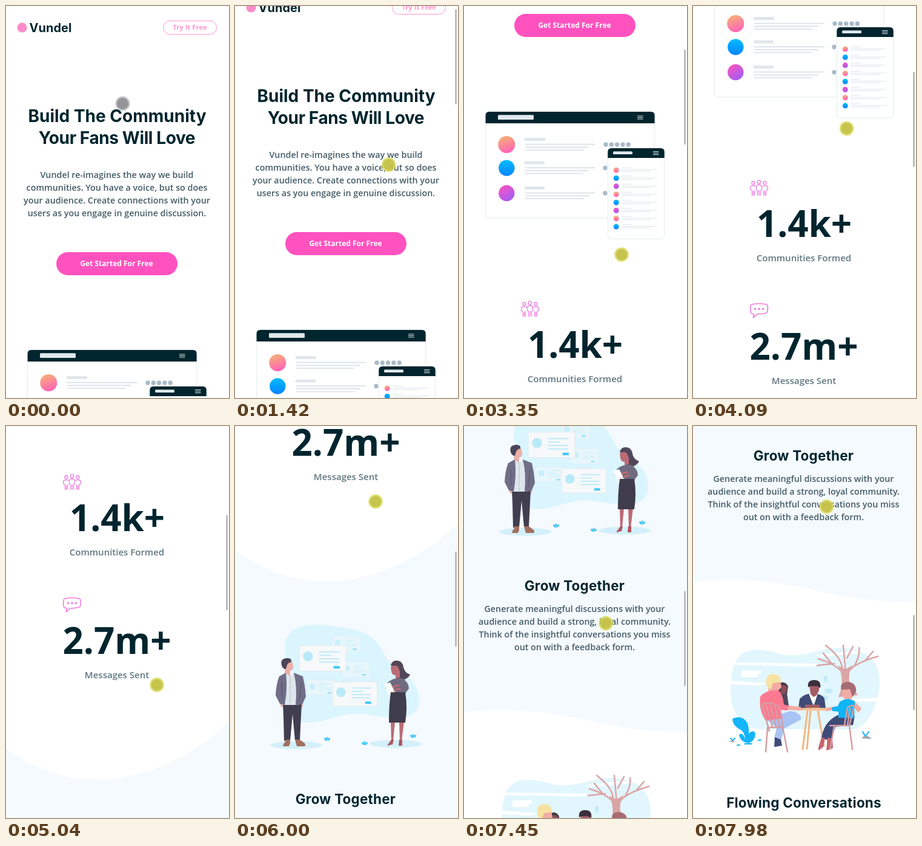
Animation, 368 px wide and 645 px high, one loop 8 s. Source, as an HTML page:

```html
<!DOCTYPE html>
<html lang="en">
<head>
<meta charset="utf-8">
<style>
  html, body { margin: 0; height: 100%; overflow: hidden; background: #fff; }
  svg { display: block; width: 368px; height: 645px; }
  text { text-anchor: middle; }
  .head { font: 700 28px Inter, sans-serif; fill: #00252e; }
  .sub { font-size: 22.4px; letter-spacing: .25px; }
  .copy { font: 600 14.3px "Open Sans", sans-serif; fill: #445c66; }
  .stat { font: 700 60px "Open Sans", sans-serif; fill: #00252e; }
  .label { font: 600 15px "Open Sans", sans-serif; fill: #5f7680; }
  .btn { font: 700 12px "Open Sans", sans-serif; fill: #fff; }
  .line { fill: none; stroke-linecap: round; stroke-linejoin: round; }
</style>
</head>
<body>
<svg viewBox="0 0 368 645">
  <defs>
    <linearGradient id="peach" x2=".35" y2="1"><stop stop-color="#f3b76f"/><stop offset="1" stop-color="#ff68b4"/></linearGradient>
    <linearGradient id="sky" x2="0" y2="1"><stop stop-color="#00bdff"/><stop offset="1" stop-color="#0a84ff"/></linearGradient>
    <linearGradient id="plum" x2=".6" y2="1"><stop stop-color="#ff54b8"/><stop offset="1" stop-color="#a85cf6"/></linearGradient>
  </defs>
  <g id="page">
    <path d="M0 1328C90 1399 235 1407 368 1285V1978C320 1980 280 1975 230 1965S100 1933 0 1946Z" fill="#f5faff"/>

    <circle cx="26.5" cy="35.5" r="8" fill="#fb8cca"/>
    <text class="head" x="73.5" y="42.5" style="font-size:20px">Vundel</text>
    <rect x="259.5" y="24.5" width="88" height="22" rx="11" fill="#fff" stroke="#ff96cf"/>
    <text class="btn" x="303.5" y="39" style="font-size:11.3px;fill:#ff96cf">Try It Free</text>

    <text class="head" x="183.5" y="191">Build The Community</text>
    <text class="head" x="183" y="227" letter-spacing="-.4">Your Fans Will Love</text>
    <g id="intro" class="copy"></g>
    <rect x="83" y="405" width="200" height="38" rx="19" fill="#ff52bf"/>
    <text class="btn" x="182.5" y="428">Get Started For Free</text>

    <g id="devices"></g>

    <g class="line" stroke="#ec7fe0" stroke-width="1.3">
      <path d="M106.5 902.5V895L104.500 893V888Q105 885 109 885T113.500 888V893L111.500 895V902.500M109 894V902.500"/><circle cx="109" cy="880.500" r="2.800"/>
      <g id="friend"><circle cx="99.500" cy="882" r="2.500"/><path d="M97.500 902.500V895L94.700 893V889Q95 886.500 99.500 886.500Q102.500 886.500 103 888M101.500 902.500V895M99.500 896V902.500"/></g>
      <use href="#friend" transform="matrix(-1 0 0 1 218 0)"/>
      <path stroke-width="1.700" d="M97 1082Q109 1079.500 121 1082Q123.500 1083 123.300 1088Q123.500 1095 121 1096Q114 1098 106 1098L99.500 1104L100.500 1098L97 1097Q94.500 1096 94.700 1089T97 1082Z"/>
      <path stroke-width="3.600" d="M102.500 1089.500h.1m6.400 0h.1m6.400 0h.1"/>
    </g>
    <text class="stat" x="183.500" y="971">1.4k+</text>
    <text class="label" x="183" y="1011">Communities Formed</text>
    <text class="stat" x="183" y="1173">2.7m+</text>
    <text class="label" x="183" y="1213">Messages Sent</text>

    <g transform="translate(0 1340)">
      <path fill="#daf5fe" d="M82 150C82 120 105 111 130 111C165 112 195 116 216 126C235 136 240 147 250 166C260 184 304 195 304 236C303 260 282 267 255 264C225 261 210 255 188 258C160 262 142 275 112 271C96 268 102 250 107 232C112 205 82 180 82 150Z"/>
      <g id="cards"></g>
      <g fill="#d3f0fa"><ellipse cx="101" cy="309" rx="43" ry="6.500"/><ellipse cx="265" cy="307" rx="43" ry="6.500"/></g>
      <g id="sprouts" fill="#3fc6f6"></g>

      <path fill="#eab0a8" d="M83 176L94 171L96 178Q97 186 91 187V195H82ZM74 239h6v7h-4zM107 239h6l-2 8h-4z"/>
      <path fill="#4c4459" d="M77 178Q74 167 85 166Q94 165 93 172Q88 173 86 177L84 184Q79 184 77 178Z"/>
      <path fill="#413e50" d="M79 241H110L107 301H99L95 258L91 302H81L80 262Z"/>
      <path fill="#dee6ed" d="M82 190L90 195L97 190L104 243H79Z"/>
      <path fill="#706d86" d="M84 190L73 196Q68 208 67 227L74 241L82 243Q87 215 84 190ZM97 190L112 196Q116 212 117 229L111 242L100 243Q103 214 97 190Z"/>
      <path class="line" stroke="#b6c1cd" d="M91 196V242"/>
      <path class="line" stroke="#565369" d="M77 207L78 232M109 207L106 236"/>
      <path fill="#a36f5e" d="M83 300H91V306L89 311H79Q80 306 83 304ZM99 300H107L115 306Q117 310 115 311H102Z"/>

      <path fill="#51475b" d="M257 178Q259 169 268 170Q277 171 278 181Q280 190 289 193Q286 199 278 202L267 199Q271 188 266 181Z"/>
      <path fill="#bb6b74" d="M257 180Q264 176 269 180L272 188V198L265 199V194Q259 194 258 188ZM257 270H264L261 303H258ZM271 270H279L275 303H272Z"/>
      <path fill="#716b7f" d="M252 206Q262 197 276 199Q287 206 287 216L281 224H257L248 215Z"/>
      <path fill="#fff" d="M246 209L256 206L265 223L254 227Z"/>
      <path class="line" stroke="#bb6b74" stroke-width="3" d="M261 213L270 211M263 219L272 216"/>
      <path fill="#3f3c4b" d="M257 222H281Q285 246 281 272H254Q254 243 257 222Z"/>
      <path fill="#b3565f" d="M258 300H262L260 308L251 310ZM271 300H276V310H270Z"/>
    </g>
    <text class="head sub" x="182.500" y="1746">Grow Together</text>
    <g id="grow" class="copy"></g>

    <g transform="translate(0 1689)">
      <path fill="#e2f6fd" d="M62 430C63 395 72 370 98 369C135 366 140 380 172 377C205 374 225 361 258 366C290 371 308 388 308 422C307 460 285 498 265 499H112C80 498 60 468 62 430Z"/>
      <path fill="#fff" d="M66 389L206 391L200 396L64 393ZM80 402H112V408H107V413H80ZM60 419L122 423L110 427L60 425ZM244 450L310 447V453L250 454ZM200 377L264 370L285 373L210 380Z"/>
      <g fill="#c4eaf7"><ellipse cx="219" cy="416" rx="3" ry="6"/><ellipse cx="224" cy="436" rx="7" ry="4"/><ellipse cx="217" cy="447" rx="7" ry="4"/></g>
      <path class="line" stroke="#dba5a5" stroke-width="2.500" d="M250 410Q240 393 207 383M228 390L215 374M246 397Q244 380 219 361M252 405Q250 382 248 361M255 407Q263 391 305 379M266 395Q276 378 274 365M285 385L297 371M254 382L264 363M233 391L205 394"/>
      <path fill="#dba5a5" d="M240 394Q250 401 254 399L264 393Q256 404 258 420L272 443L240 446Q251 420 240 394Z"/>

      <path fill="#48394a" d="M140 427Q149 416 157 428L155 442L142 455Z"/>
      <path fill="#8d4f5a" d="M146 427Q156 424 155 434L151 443L144 441Z"/>
      <path fill="#52455b" d="M141 441L155 440L158 461H141Z"/>
      <path fill="#404b78" d="M174 464L176 449Q184 440 198 440Q214 441 217 449L219 465H174Z"/>
      <path fill="#fff" d="M191 440H206L199 461Z"/>
      <path fill="#a45c66" d="M192 426H208V435L204 443L199 446L194 441Z"/>
      <path fill="#3d2f3b" d="M190 430Q188 418 200 418Q212 418 210 431L205 428H194Z"/>
      <path class="line" stroke="#a45c66" stroke-width="5" d="M187 461H207"/>

      <path class="line" stroke="#f1b883" stroke-width="3" d="M189 468L181 532M194 468L188 531M206 468L216 526"/>
      <ellipse cx="202" cy="466" rx="36" ry="2.500" fill="#f6c394"/>

      <path fill="#a9c4f4" d="M120 482L160 469Q180 472 178 483L150 498L145 519L134 514L138 496Z"/>
      <path fill="#404b78" d="M135 512L145 516L147 526L134 528Z"/>
      <path fill="#f3aca5" d="M124 420L144 418L146 430L140 436L136 443L124 438ZM148 459L178 462V468L148 467Z"/>
      <path fill="#f6e3a2" d="M122 429Q117 410 131 408Q145 408 145 421L132 423L128 434Z"/>
      <path fill="#fd7990" d="M111 445Q122 433 141 435Q148 440 150 458L158 461L156 468L145 467L148 481L120 485Q108 467 111 445Z"/>

      <path fill="#404a78" d="M238 476L267 477L264 492L235 495L228 518L212 514Q215 488 238 476Z"/>
      <path fill="#c6666f" d="M212 512L218 514L215 528L207 534V529ZM222 512L230 515L231 530L220 534Z"/>
      <path fill="#f3aca5" d="M247 432H264L264 444L259 453L248 448ZM219 464L238 461V467L219 469ZM266 452L278 465L273 472L263 460Z"/>
      <path fill="#a76b74" d="M245 434Q241 422 255 421Q270 422 269 437L263 446L259 433Z"/>
      <path fill="#0fb5f5" d="M242 454Q254 445 267 453L266 481L240 480V470L230 469L229 463L239 461Z"/>

      <g class="line" stroke="#d79ca1" stroke-width="2.500">
        <path d="M126 502L114 458Q126 452 142 462L149 496H123L120 536M148 496L156 536M121 460L131 495M128 460L137 495M135 461L143 495"/>
        <path d="M226 493H258L265 465Q268 456 255 463L250 491M258 493L263 532M233 494L226 532M259 465L255 492"/>
      </g>
      <path fill="#14b5fa" d="M65 482C77 475 94 481 92 506Q101 498 103 507Q102 518 92 522Q78 520 76 508Q82 503 86 515Q85 501 75 498Q65 491 65 482Z"/>
      <path class="line" stroke="#14b5fa" stroke-width="2" d="M73 525h4m8-2h12m11-6h4M62 514l3 3m4-3l-3 3M280 503l4 7m6-7l-5 7"/>
      <path fill="#9caab0" d="M60 520Q65 514 69 520ZM278 514Q285 505 295 515Z"/>
    </g>
    <text class="head sub" x="183" y="2317">Flowing Conversations</text>
  </g>
  <rect id="bar" x="363" width="3" height="156" fill="#bcbcc0"/>
  <g id="touch"><circle r="11.800" opacity=".85"/><circle r="9.300" opacity=".85"/></g>
</svg>
<script>
const $ = id => document.getElementById(id);
const box = (x, y, w, h, fill, r = 0, extra = '') =>
  `<rect x="${x}" y="${y}" width="${w}" height="${h}" rx="${r}" fill="${fill}" ${extra}/>`;
const dot = (x, y, r, fill) => `<circle cx="${x}" cy="${y}" r="${r}" fill="${fill}"/>`;
const lines = (x, y, list) => list.map((s, i) => `<text x="${x}" y="${y + 21 * i}">${s}</text>`).join('');
const tints = ['url(#peach)', 'url(#sky)', 'url(#plum)'];

$('intro').innerHTML = lines(183, 283, ['Vundel re-imagines the way we build',
  'communities. You have a voice, but so does', 'your audience. Create connections with your',
  'users as you engage in genuine discussion.']);
$('grow').innerHTML = lines(182.5, 1781, ['Generate meaningful discussions with your',
  'audience and build a strong, loyal community.', 'Think of the insightful conversations you miss',
  'out on with a feedback form.']);

function windowFrame(x, y, w, h, bar, pill, menuX) {
  const menu = [0, 2.5, 5].map(d => box(menuX, y + bar / 2 - 3 + d, 9.5, 1, '#dfe8ec')).join('');
  return box(x, y, w, h, '#fff', 6, 'stroke="#eff4f6" stroke-width="2"') +
    `<path d="M${x} ${y + bar}v${6 - bar}q0-6 6-6h${w - 12}q6 0 6 6v${bar - 6}z" fill="#00252e"/>` +
    box(pill[0], y + 5.3, pill[1], bar - 11.3, '#dfe8ec', 1.5) + menu;
}

function devices() {
  let s = windowFrame(35.6, 566, 279, 175, 19, [56, 59], 286);
  [0, 38.5, 80].forEach((dy, i) => {
    s += dot(70.3, 620 + dy, i ? 13.2 : 14, tints[i]) + box(100, 609 + dy, 34 - (i > 0), 5, '#dfe7ec', 1);
    [116, 106, 97].forEach((w, k) => s += box(100.5, 618.5 + dy + 4.7 * k, w, 2.2, '#dfe7ec', 1));
    for (let k = 0; k < 5; k++) s += dot(234 + 9.3 * k - (i > 0), 620 + dy, 3.7, '#a9bac7');
  });
  s += windowFrame(237.3, 626, 93.4, 149, 16, [246, 32], 312);
  for (let i = 0; i < 8; i++) {
    const y = 662 + 13.3 * i;
    s += dot(251.2, y, 4.5, tints[i % 3]);
    [[-4, 17], [-1, 59], [1.5, 48]].forEach(([dy, w]) => s += box(260, y + dy, w, 1, '#dde6ec'));
  }
  return s;
}

function card(x, y, k, opacity) {
  let s = box(0, 0, 75, 41, '#f6f8fa', 0, 'stroke="#dfe9ef"') + dot(14, 17.5, 8, '#b9eaf8');
  [32, 19, 32, 32].forEach((w, i) => s += box(32, 9.5 + 5.5 * i, w, 1.8, '#b9eaf8'));
  s += box(55, 33, 10, 4, '#43c8f5');
  return `<g transform="translate(${x} ${y}) scale(${k})" opacity="${opacity}">${s}</g>`;
}

$('devices').innerHTML = devices();
$('cards').innerHTML = card(161, 130, .61, .5) + card(176, 172, .61, .5) + card(119, 202, .61, .5) +
  card(106, 145, 1.03, 1) + card(161, 205, .98, 1);
$('sprouts').innerHTML = [[152, 299], [214, 306], [294, 294]].map(([x, y]) =>
  `<path d="M${x} ${y - 4}q3 3 0 7q-3-4 0-7M${x - 5} ${y - 2}q5 0 5 5q-5 0-5-5M${x + 5} ${y - 2}q-5 0-5 5q5 0 5-5"/>`).join('');

// Columns: time, value(s)
const scrollKeys = [[0, 0], [1010, 0], [2250, 199], [2900, 380], [3350, 392], [4250, 640], [4800, 790],
  [5040, 798], [6000, 1124], [6500, 1310], [6960, 1340], [7980, 1689], [8400, 1850]];
const touchKeys = [[0, 192.5, 160.5], [70, 192.5, 160.5], [680, 254, 301], [1010, 254, 301], [2250, 251, 91],
  [2400, 250, 70], [3250, 260, 409], [3350, 260, 409], [4250, 252, 160], [4350, 251, 145], [4980, 249, 430],
  [5040, 249, 426], [6000, 232, 124.5], [6080, 231, 105], [6880, 243, 460], [6960, 243, 456], [7980, 220.5, 133], [8300, 217, 60]];
const presses = [[1010, 2380], [3300, 4330], [5000, 6060], [6900, 8000]];

// Monotone cubic interpolation: smooth, without overshoot
function at(keys, t, col = 1) {
  const slope = i => keys[i + 1] && keys[i] ? (keys[i + 1][col] - keys[i][col]) / (keys[i + 1][0] - keys[i][0]) : 0;
  const tangent = i => {
    const a = slope(i - 1), b = slope(i);
    return a * b > 0 ? 2 * a * b / (a + b) : 0;
  };
  const i = keys.findIndex(k => k[0] > t) - 1;
  const h = keys[i + 1][0] - keys[i][0], u = (t - keys[i][0]) / h, v = 1 - u;
  return v * v * (1 + 2 * u) * keys[i][col] + u * u * (3 - 2 * u) * keys[i + 1][col] +
    h * u * v * (v * tangent(i) - u * tangent(i + 1));
}

function draw(now) {
  const t = now % 8000, y = at(scrollKeys, t);
  const pressed = presses.some(([a, b]) => t >= a && t < b);
  const [ring, core] = $('touch').children;
  $('page').setAttribute('transform', `translate(0 ${-Math.round(y)})`);
  $('bar').setAttribute('y', y * .1845 - .5);
  $('bar').setAttribute('opacity', Math.min(1, y / 5));
  $('touch').setAttribute('transform', `translate(${at(touchKeys, t)} ${at(touchKeys, t, 2)})`);
  ring.setAttribute('fill', pressed ? '#d9d95c' : '#b4b4ba');
  core.setAttribute('fill', pressed ? '#c3c048' : '#8d8d91');
  requestAnimationFrame(draw);
}
requestAnimationFrame(draw);
</script>
</body>
</html>
```
